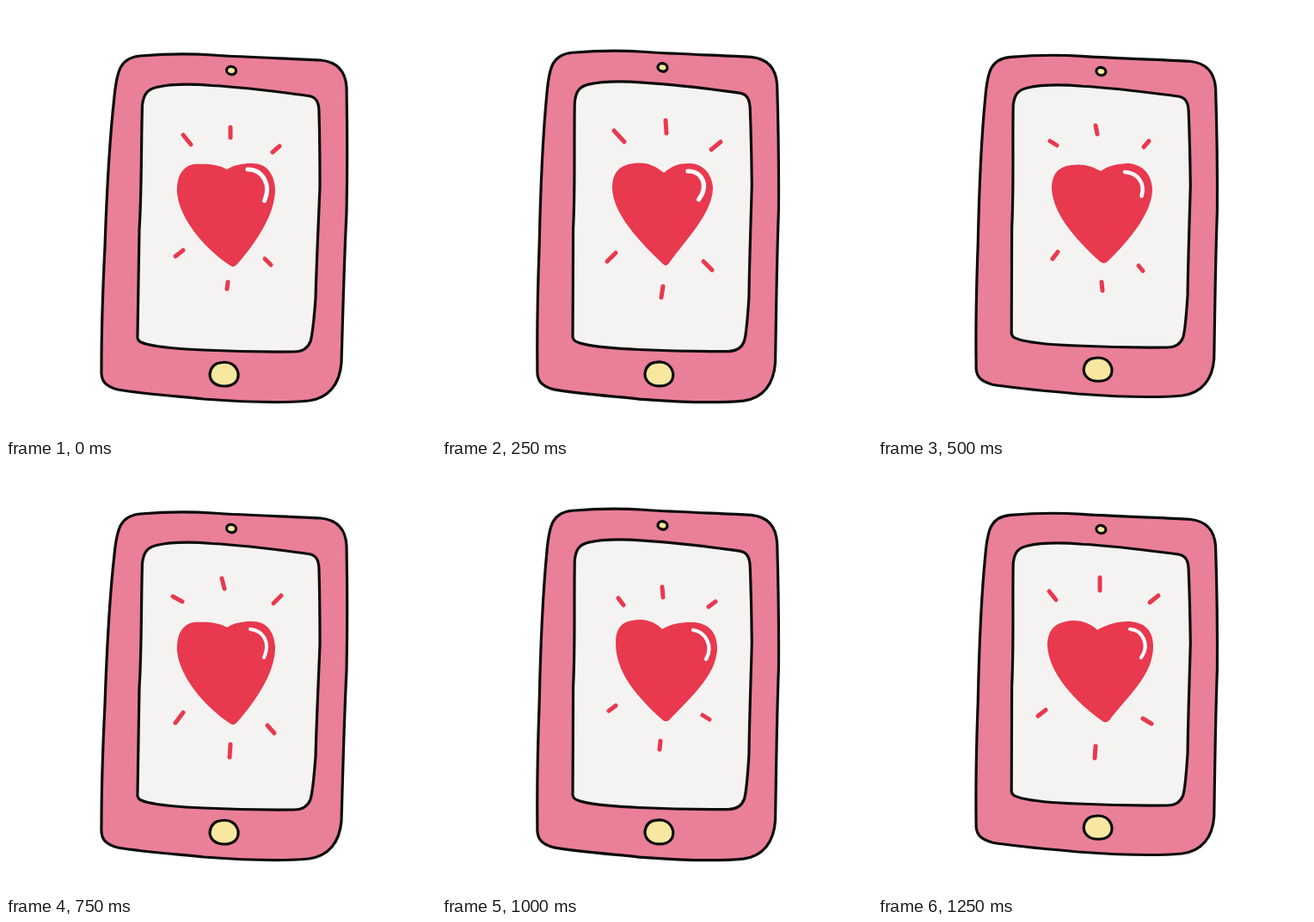
An HTML page that plays this animation: 500 by 500 pixels, repeating every 1.5 s.

```html
<!DOCTYPE html>
<html lang="en">
<head>
<meta charset="utf-8">
<title>Phone with a beating heart</title>
<style>
  html, body { margin: 0; width: 100%; height: 100%; overflow: hidden; background: #fff; }
  svg { display: block; width: 100%; height: 100%; }
  path { stroke-linecap: round; stroke-linejoin: round; }
</style>
</head>
<body>
<svg viewBox="0 0 500 500">
  <g id="phone" stroke="#0b0b0b" stroke-width="3.2">
    <path fill="#ea7f98" d="M156 58C180 56 210 55 240 57C285 60 330 61 366 63C386 65 395 76 396 95C397 150 397 190 396 240C393 300 392 350 390 415C388 440 375 456 352 459C320 462 270 460 230 457C190 453 160 451 130 446C115 442 110 436 111 422C111 370 113 320 115 280C117 220 121 150 126 105C129 75 133 60 156 58Z"/>
    <path fill="#f5f3f2" d="M175 94.500C190 91 215 90.500 240 92.500C285 95 325 101 352 104.500C361 106 364 112 364 124C365 160 365 180 365 210C363 260 361 300 360 340C358 365 357 380 354 390C351 398 345 402 335 402C290 402.500 260 401.500 230 400C205 399 180 397 165 393.500C155 391 152 389 153 382C154 340 154 300 155 260C158 215 157 160 158.500 115C160 103 164 97 175 94.500Z"/>
    <ellipse cx="262" cy="75" rx="5.6" ry="4.6" fill="#f7e7a0" transform="rotate(12 262 75)"/>
    <path fill="#f7e7a0" d="M251 414.500C261 413 268 418 270 427C271 437 264 442 254 442C243 442 237 436 237 428C238 420 243 415 251 414.500Z"/>
  </g>
  <path id="heart" fill="#e8394f"/>
  <path id="shine" fill="none" stroke="#fff"/>
  <path id="rays" fill="none" stroke="#e8394f" stroke-width="5"/>
</svg>
<script>
const STEP = 250;

// Three wobbling poses of the phone
const poses = [
  "matrix(1 0 0 1 0 0)",
  "matrix(.992 0 .012 1.0095 -4.3 -4.3)",
  "matrix(.992 0 .013 .9816 -1.5 2.4)"
];

const restingHeart = "M257 190C247 184 233 183 219 184C204 186 198 200 199 218C202 248 232 283 261 302Q265 305 269 300C290 276 313 243 313 213C312 193 301 182 285 183C274 183 265 185 257 190Z";

const drawings = [
  {
    heart: restingHeart,
    shine: "M281 190C298 190 309 207 300.500 226.500", width: 5,
    rays: "M206 150L215 161M261 141V153M310 170L318 163M197 291L206 284M301 294L308 301M258 321L257 329"
  },
  {
    heart: "M258 194C248 186 238 181 223 183C205 185 198 195 198 212C199 237 219 264 257 300Q260.500 304 264 299C283 272 315 241 315 211C314 195 303 183 288 183C275 183 267 186 258 194Z",
    shine: "M286 192C302 192 311 208 298.500 225", width: 5.2,
    rays: "M200 145L212 158M260 133L261 148M313 167L324 158M192 297L202 287M304 297L314 307M257 326L255 339"
  },
  {
    heart: "M259 192C249 186 238 183 225 185C208 187 202 197 202 213C204 240 225 267 258 297Q263 301 267 297C292 273 319 240 319 213C318 193 305 183 289 183C276 184 267 186 259 192Z",
    shine: "M287 193C302 194 311 206 306.500 221", width: 4.5,
    rays: "M200 157L208 162M253 139L255 149M309 164L315 157M203 294L209 286M303 302L308 308M260 321L261 331"
  },
  {
    heart: restingHeart,
    shine: "M284 192C299 194 308 207 300 225", width: 4,
    rays: "M194 154L205 160M251 133L254 145M311 162L320 153M197 301L206 289M304 304L312 313M261 326L260 341"
  },
  {
    heart: "M256 192C247 183 235 179 221 182C207 184 202 194 202 208C202 238 220 265 257 298Q261 301 265 297C285 275 320 246 320 214C320 194 308 184 290 184C277 184 266 186 256 192Z",
    shine: "M292 193C306 195 316 211 307 227", width: 4.2,
    rays: "M205 156L211 164M256 143L257 155M310 166L318 160M194 287L202 281M303 292L311 297M254 322L253 332"
  },
  {
    heart: "M255 193C247 185 233 180 219 183C203 186 197 196 197 212C199 244 230 277 261 299Q265 302 269 298C290 270 320 246 320 212C320 194 311 184 291 183C278 183 265 187 255 193Z",
    shine: "M293 192C307 193 317 210 306 225", width: 4.2,
    rays: "M199 148L207 158M258 132V147M316 161L326 153M186 293L195 286M308 296L318 302M253 328L252 342"
  }
];

const set = (id, name, value) => document.getElementById(id).setAttribute(name, value);

function draw(index) {
  const { heart, shine, width, rays } = drawings[index];
  set("phone", "transform", poses[index % poses.length]);
  set("heart", "d", heart);
  set("shine", "d", shine);
  set("shine", "stroke-width", width);
  set("rays", "d", rays);
}

const start = performance.now();

function tick() {
  const elapsed = performance.now() - start;
  draw(Math.floor(elapsed / STEP) % drawings.length);
  requestAnimationFrame(tick);
}
tick();
</script>
</body>
</html>
```
